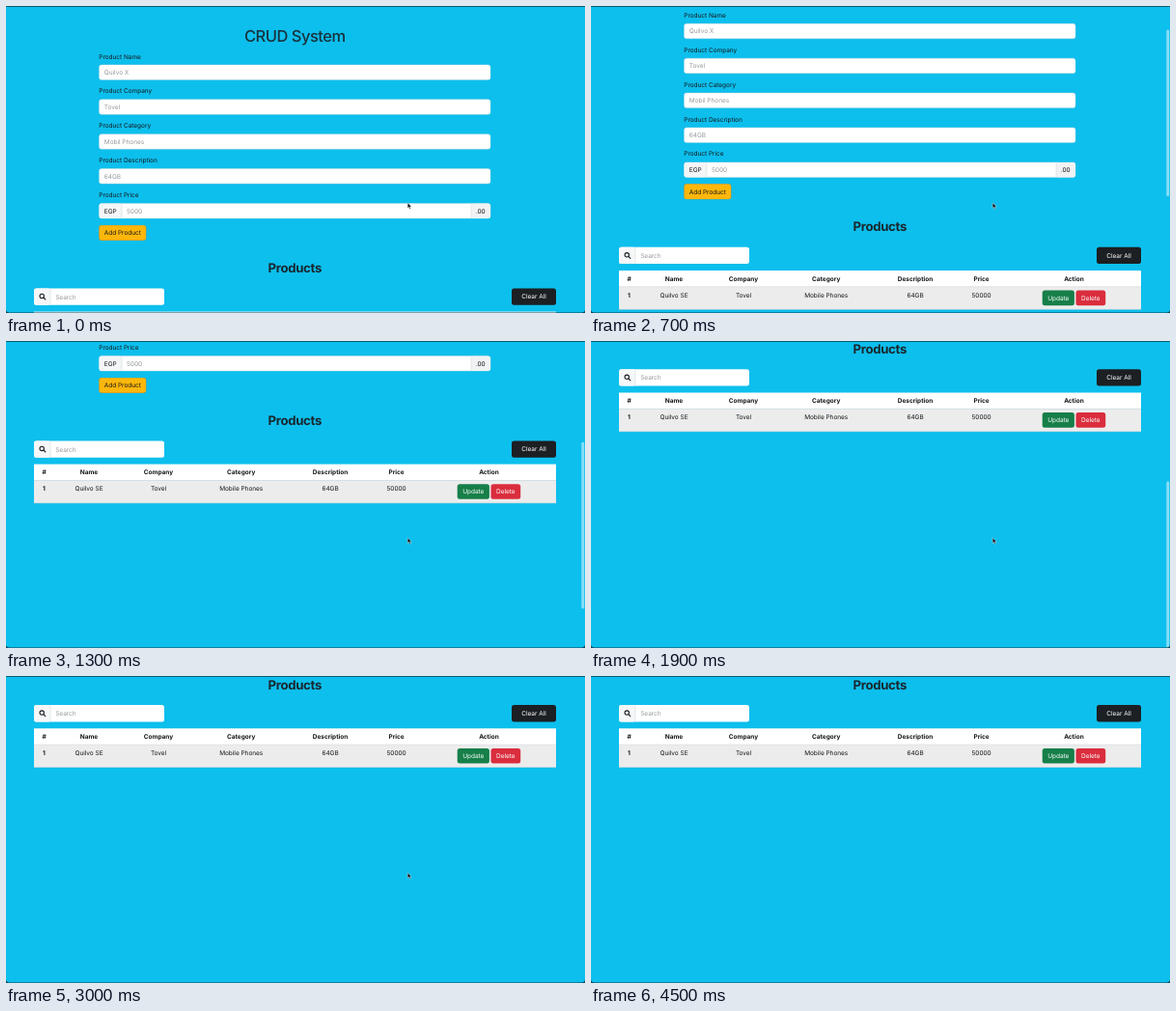
An HTML page for the animation above (4.6 s loop, 600 by 318 pixels).

```html
<!DOCTYPE html>
<html lang="en">
<head>
<meta charset="utf-8">
<title>CRUD System</title>
<style>
  html, body { margin: 0; width: 100%; height: 100%; overflow: hidden; background: #0dbfed; }
  svg { display: block; width: 100vw; height: 100vh; }
  text {
    font: 6.5px Inter, "Open Sans", sans-serif;
    fill: #15181b;
    letter-spacing: -.03px;
    text-rendering: geometricPrecision;
  }
  .mid { text-anchor: middle; }
  .bold { font-weight: 700; }
  .hint { fill: #95999d; }
  .light { fill: #fff; }
  .title { font-size: 16.5px; font-weight: 500; letter-spacing: -.5px; fill: #18323c; }
  .heading { font-size: 13.2px; font-weight: 700; letter-spacing: -.34px; fill: #18282f; }
</style>
</head>
<body>
<svg viewBox="0 0 600 318" xmlns="http://www.w3.org/2000/svg">
  <rect width="600" height="318" fill="#0dbfed"/>
  <g id="page"></g>
  <rect id="thumb" x="596.3" width="2.9" height="172.5" rx="1.4" fill="#fff"/>
  <path id="cursor" d="M416.2 203.8v5.6l1.3-1.1 .9 2 1-.5-.9-1.9h1.7z" fill="#0a0a0a" stroke="#e8f7fc" stroke-width=".45"/>
  <rect width="600" height="1" fill="#0b5a70"/>
  <path d="M0 314.5Q.3 317.4 3.5 317.5H596.5Q599.7 317.4 600 314.5V318H0z" fill="#0a4252"/>
</svg>
<script>
const LOOP = 4600, STEP = 100;
const VIEW = 318, PAGE = 580.3;
const el = id => document.getElementById(id);

const rect = (x, y, w, h, fill, rx = 0, extra = '') =>
  `<rect x="${x}" y="${y}" width="${w}" height="${h}" rx="${rx}" fill="${fill}" ${extra}/>`;
const text = (x, y, label, cls = '') => `<text x="${x}" y="${y}" class="${cls}">${label}</text>`;
const button = (x, y, w, h, fill, label, cls) =>
  rect(x, y, w, h, fill, 2.5) + text(x + w / 2, y + h / 2 + 2.4, label, 'mid ' + cls);
const line = (d, color) => `<path d="${d}" stroke="${color}" stroke-width=".5" fill="none"/>`;

function buildForm() {
  const fields = [
    ['Name', 'Quilvo X'], ['Company', 'Tovel'], ['Category', 'Mobil Phones'],
    ['Description', '64GB'], ['Price', '5000']
  ];
  const rows = fields.map(([name, hint], i) => {
    const y = 60.9 + 35.9 * i, isPrice = name === 'Price';
    const addons = isPrice
      ? rect(96.7, y + .2, 23.3, 15.1, '#f4f6f7', 2.3) + rect(482, y + .2, 19.8, 15.1, '#f0f2f3', 2.3) +
        line(`M120 ${y}v15.5M482 ${y}v15.5`, '#ced4da') +
        text(101.8, y + 10.2, 'EGP') + text(486.8, y + 10.2, '.00')
      : '';
    return text(96.3, y - 6.4, 'Product ' + name) +
      rect(96.5, y, 405.5, 15.5, '#fff', 2.5, 'stroke="#ced4da" stroke-width=".4"') + addons +
      text(isPrice ? 125 : 101.8, y + 10.2, hint, 'hint');
  });
  return text(299.3, 37, 'CRUD System', 'title mid') + rows.join('') +
    rect(96.2, 226.9, 49.2, 16, '#a98f45', 2.8) +
    button(96.7, 227.2, 48.2, 15.4, '#fdb70b', 'Add Product', '');
}

function buildSearch() {
  return text(299.3, 275.9, 'Products', 'heading mid') +
    rect(29, 292.4, 135, 17.3, '#fff', 2.5) + rect(29, 292.4, 17, 17.3, '#f5f7f8', 2.5) +
    line('M46 292.4v17.3', '#ced4da') +
    '<g fill="none" stroke="#1c1f23" stroke-width="1.1" stroke-linecap="round">' +
    '<circle cx="37.2" cy="300.4" r="2.2"/><path d="M39 302.2l1.8 1.8"/></g>' +
    text(51.2, 303.5, 'Search', 'hint') +
    button(524, 292.4, 46, 17.3, '#1c1f23', 'Clear All', 'light');
}

function buildTable() {
  const columns = [
    [39.5, '#', '1'], [86, 'Name', 'Quilvo SE'], [158, 'Company', 'Tovel'],
    [243.7, 'Category', 'Mobile Phones'], [336, 'Description', '64GB'],
    [404.6, 'Price', '50000'], [500.4, 'Action', '']
  ];
  return rect(29, 316.6, 541, 17, '#fff') + rect(29, 333.3, 541, 23.6, '#ececec') +
    line('M29 333.4H570M29 356.8H570', '#cfd3d6') +
    columns.map(([x, head, value], i) =>
      text(x, 327.2, head, 'mid bold') + text(x, 344.3, value, i ? 'mid' : 'mid bold')).join('') +
    button(467.7, 337.2, 33.2, 15.6, '#177f49', 'Update', 'light') +
    button(502.5, 337.2, 30.7, 15.6, '#da2d3d', 'Delete', 'light');
}

// Two flicks of the wheel, then a slight overshoot that settles.
const scrollKeys = [
  [300, 0], [400, 4], [500, 16], [600, 31], [700, 42.6], [800, 52], [900, 59], [1000, 66.6],
  [1100, 103], [1200, 150], [1300, 189], [1400, 215], [1500, 234], [1600, 247],
  [1700, 256], [1800, 261], [1900, 263.1], [2100, 263], [2300, 262.3]
];
const fadeKeys = [[300, 0], [400, .5], [2200, .5], [2600, 0]];

function sample(keys, t) {
  if (t <= keys[0][0]) return keys[0][1];
  const i = keys.findIndex(([time]) => time >= t);
  if (i < 0) return keys[keys.length - 1][1];
  const [t0, a] = keys[i - 1], [t1, b] = keys[i];
  return a + (b - a) * (t - t0) / (t1 - t0);
}

function draw(ms) {
  const t = Math.floor(ms % LOOP / STEP) * STEP;
  const scroll = sample(scrollKeys, t);
  el('page').setAttribute('transform', `translate(0 ${-scroll})`);
  el('thumb').setAttribute('y', 1.3 + scroll * VIEW / PAGE);
  el('thumb').setAttribute('opacity', sample(fadeKeys, t));
  el('cursor').setAttribute('opacity', t < 3600 ? 1 : 0);
}

el('page').innerHTML = buildForm() + buildSearch() + buildTable();
const start = performance.now();
function tick() {
  draw(performance.now() - start);
  requestAnimationFrame(tick);
}
tick();
</script>
</body>
</html>
```
